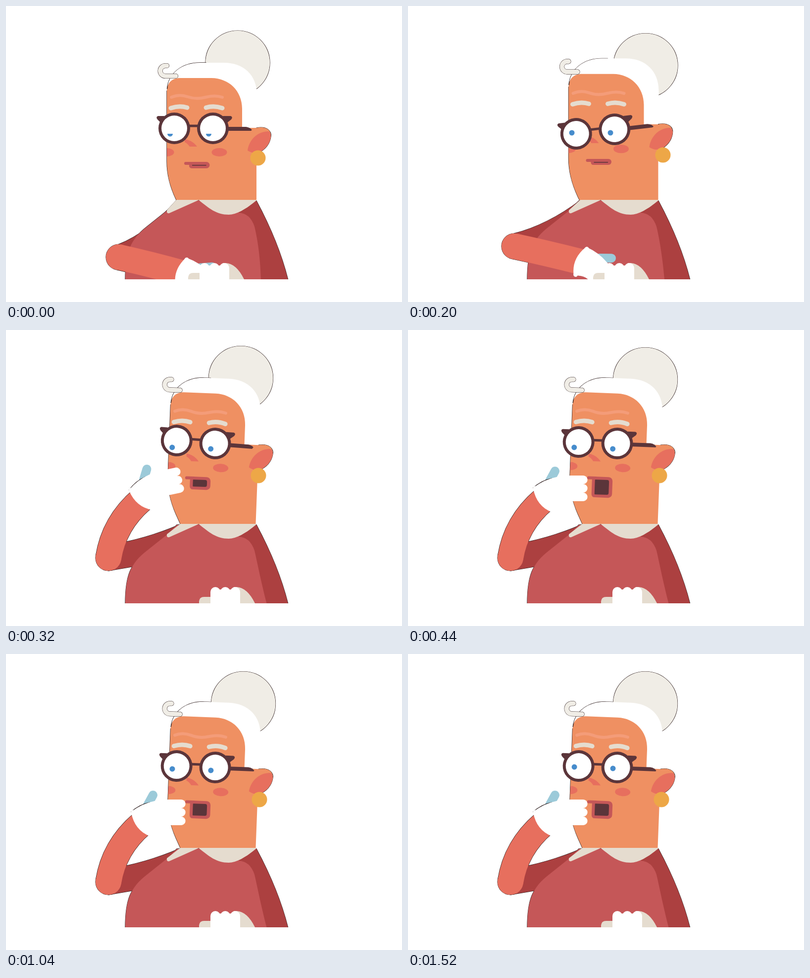
Write an HTML page with a canvas that moves like this. It is 800 px wide and 600 px high and loops after 1680 ms.

```html
<!DOCTYPE html>
<html lang="en">
<head>
<meta charset="utf-8">
<title>Lady with a glove</title>
<style>
html, body { margin: 0; width: 100%; height: 100%; overflow: hidden; background: #fff; }
canvas { display: block; }
</style>
</head>
<body>
<canvas id="stage" width="800" height="600"></canvas>
<script>
const g = document.getElementById('stage').getContext('2d');
const LOOP = 1680, STEP = 40, FLOOR = 554;
const SKIN = '#ef9062', PINK = '#e76f5e', RED = '#c55758', DARK = '#ac4040', CREAM = '#e5dccf',
  PALE = '#f0ede6', RIM = '#5b353a', GOLD = '#eda747', BLUE = '#468ccc', SKY = '#9ccad9',
  WRINKLE = '#f49c79', INK = '#2a1a1a', WHITE = '#fff';

// Each track holds one value per key time.
const KEYS = [0, 120, 200, 240, 320, 440];
const headTracks = {
  turn: [0, 0, 0, .038, .038, .038],
  x: [0, 0, -.5, .5, -1, -1],
  y: [0, 8, -8, -41, -14, -14],
  stretch: [0, 0, .01, .085, 0, 0],
  curl: [1, 1, 1, .38, 1, 1],
  bunX: [468, 472, 480, 486.5, 474.5, 479.5],
  bunY: [115, 123, 120.5, 66, 97.5, 100.5],
  ringX: [509, 512, 515, 516, 510, 508],
  ringY: [308, 314, 302, 286, 295, 295]
};
const faceTracks = {
  specsY: [0, 4, 14.5, 24.5, -2.2, -.7],
  specsTurn: [0, -.04, -.115, -.077, .039, 0],
  pupilY: [259, 262, 265, 275.6, 258.6, 258.6],
  pupilR: [5.5, 5.5, 5.5, 9, 5.5, 5.5],
  lid: [259, 245, 230, 230, 230, 230],
  mouth: [13, 13, 12, 12, 26, 42]
};
const armTracks = {
  neck: [344, 342, 348, 357, 352, 352],
  elbowX: [228, 226, 215, 212, 207, 207],
  elbowY: [509, 505, 487, 479, 462, 462],
  bendX: [295, 292, 280, 277, 218, 218],
  bendY: [524, 518, 501, 463, 392, 392],
  wristX: [355, 353, 349, 347.5, 274, 274],
  wristY: [541, 536, 518.5, 462, 343.5, 344],
  hand: [57, 60, 61.6, 57, -12, 0],
  lap: [-22, -20, -16, -11, 0, 0]
};

function at(t, times, vals) {
  if (t <= times[0]) return vals[0];
  const i = times.findIndex(k => k > t);
  if (i < 0) return vals[vals.length - 1];
  const k = (t - times[i - 1]) / (times[i] - times[i - 1]);
  return vals[i - 1] + (vals[i] - vals[i - 1]) * k;
}

function poseAt(t) {
  const p = {};
  for (const set of [headTracks, faceTracks, armTracks])
    for (const name in set) p[name] = at(t, KEYS, set[name]);
  p.ringX += at(t, [440, 560], [0, 4]);
  p.mouth -= at(t, [600, 800], [0, 6]);
  p.pupilY -= at(t, [960, 1040, 1320], [0, 5, 8.6]) + (t >= 1520 ? .4 : 0);
  return p;
}

function fill(d, color) {
  g.fillStyle = color;
  g.fill(new Path2D(d));
}

function line(d, color, width, cap = 'round') {
  g.strokeStyle = color;
  g.lineWidth = width;
  g.lineCap = cap;
  g.stroke(new Path2D(d));
}

function oval(x, y, rx, ry, color, edge) {
  g.beginPath();
  g.ellipse(x, y, rx, ry, 0, 0, 7);
  if (edge) {
    g.strokeStyle = INK;
    g.lineWidth = 1.2;
    g.stroke();
  }
  g.fillStyle = color;
  g.fill();
}

function group(draw, x = 0, y = 0, turn = 0, px = 0, py = 0, tall = 1) {
  g.save();
  g.translate(px + x, py + y);
  g.rotate(turn);
  g.scale(1, tall);
  g.translate(-px, -py);
  draw();
  g.restore();
}

function clipRect(y, h) {
  g.beginPath();
  g.rect(0, y, 800, h);
  g.clip();
}

const JAW = 'V315C325 345 333 370 344 393L357 419L370 445';
const SKULL = `M325 172${JAW}H506V180L415 140H352C335 146 325 156 325 172Z`;

function drawHair(p) {
  line('M325.5 168C328 136 356 115 392 115H404', INK, 1.4);
  fill('M325 172C327 136 355 115 392 115H440C480 115 507 140 507 180V247H477V208C477 172 450 146 415 146H352C335 146 325 156 325 172Z', WHITE);
  const a = Math.PI * (.5 + p.curl), r = 10.5;
  const ex = 322 + r * Math.cos(a), ey = 131.5 + r * Math.sin(a);
  const curl = `M343 142H322A${r} ${r} 0 0 1 ${ex} ${ey}` + (p.curl > .95 ? 'h3' : '');
  line(curl, INK, 10);
  line(curl, PALE, 9);
}

function drawMouth(h) {
  line('M363 319H376', RED, 6);
  g.fillStyle = RED;
  g.beginPath();
  g.roundRect(370, 316, 41.5, h, [3, 8, 8, 6]);
  g.fill();
  g.fillStyle = RIM;
  g.beginPath();
  g.roundRect(376, 322, 28.5, Math.max(1.6, h - 12), h > 20 ? [1, 4, 4, 1] : 0);
  g.fill();
}

function drawFace(p) {
  line('M325 172' + JAW, INK, 1.4);
  fill(SKULL, SKIN);
  g.save();
  g.clip(new Path2D(SKULL));
  oval(324, 296.5, 15.5, 8.5, PINK);
  oval(431, 296.5, 15.5, 8.5, PINK);
  fill('M361 270C374 272 381 278 386 285H371Q366 278 361 276Z', PINK);
  g.restore();
  drawHair(p);
  line('M334 185Q350 178 367 184T403 185T437 185', WRINKLE, 6);
  line('M333 207Q350 201 366 206M404 206Q420 201 437 207', CREAM, 9);
  group(() => drawMouth(p.mouth), 0, 55 * p.stretch);
}

function drawSpecs() {
  fill('M320 223H307Q302 225 306 230L314 238Z', RIM);
  fill('M438 223H454Q459 225 455 230L445 238Z', RIM);
  fill('M446 245H485Q494 246 498 253H446Z', RIM);
  line('M369 243H389', RIM, 5);
  for (const x of [340, 418]) {
    oval(x, 248, 32, 32, RIM);
    oval(x, 248, 26, 26, WHITE);
  }
}

function drawEar() {
  line('M506 247C528 243 537 254 535 265C533 281 522 292 508 299', INK, 1.2);
  fill('M489 268C489 252 502 246 515 246C530 246 536 255 535 265C533 281 522 292 506 300L489 294Z', SKIN);
  fill('M488 293C491 271 508 254 531 254Q536 259 535 265C533 281 522 291 511 297Q499 300 488 293Z', PINK);
}

function drawHead(p) {
  const stretched = part => group(part, 0, 0, 0, 0, 180, 1 + p.stretch);
  stretched(() => drawFace(p));
  group(drawSpecs, 0, p.specsY, p.specsTurn, 379, 248);
  g.save();
  clipRect(p.lid, 200);
  for (const x of [331.5, 409.5]) oval(x, p.pupilY, 5.5, p.pupilR, BLUE);
  g.restore();
  stretched(drawEar);
}

function drawBody(p, forearm) {
  const { neck, elbowX: x, elbowY: y } = p, top = y - 26;
  const dx = neck - x, dy = top - 394;
  const upper = `M${neck} 394C${neck - .3 * dx} ${394 + .45 * dy} ${neck - .65 * dx} ${394 + .82 * dy} ${x} ${top}V${y + 26}L300 472L400 394Z`;
  const front = `M241 556C241 500 250 474 285 447L330 411L345 395H470V419Q493 420 502 447C507 468 514 505 ${527 + p.lap * .55} 556Z`;
  const back = 'M460 395H506C530 440 555 495 570 556H460Z';
  line(forearm, INK, 53.4, 'butt');
  oval(x, y, 26, 26, PINK, true);
  for (const d of [upper, front, back]) line(d, INK, 1.4);
  fill(upper, DARK);
  fill(back, DARK);
  fill(front, RED);
  fill(`M${neck} 393H390L332 419Q324 423 325 414Z`, CREAM);
  fill('M389 393H507C485 412 465 423 450 423C425 423 410 410 389 393Z', CREAM);
}

function drawGlove(outlined) {
  line('M285 308L297 286', SKY, 18);
  if (outlined) line('M253 320Q270 305 290 301', INK, 1.4);
  const knuckle = 'a8.65 8.65 0 0 1 0 17.3';
  fill(`M254 319Q275 303 300 298Q312 295 330 295H354${knuckle.repeat(3)}H320Q305 347 296 362L290 369Q260 357 253 322Z`, WHITE);
  oval(257, 321, 4.5, 4.5, WHITE);
  oval(292, 365.5, 4.5, 4.5, WHITE);
}

function drawLapHand() {
  fill('M390 556V550Q391 541 400 541H420V556Z', CREAM);
  fill('M460 521H466Q488 522 504 556H460Z', CREAM);
  fill('M413 556V531a10 10 0 0 1 20 0a10 10 0 0 1 20 0a10 10 0 0 1 20 0V556Z', WHITE);
  fill('M419 526H467V535H419Z', WHITE);
}

function draw(t) {
  const p = poseAt(t);
  g.clearRect(0, 0, 800, 600);
  g.save();
  clipRect(0, FLOOR);
  oval(p.bunX, p.bunY, 65, 65, PALE, true);

  g.save();
  clipRect(0, 394);
  group(() => drawHead(p), p.x, p.y, p.turn, 506, 393);
  g.restore();
  oval(p.ringX, p.ringY, 15.5, 15.5, GOLD);

  const forearm = `M${p.elbowX} ${p.elbowY}Q${p.bendX} ${p.bendY} ${p.wristX} ${p.wristY}`;
  drawBody(p, forearm);
  line(forearm, PINK, 52, 'butt');
  oval(p.elbowX, p.elbowY, 26, 26, PINK);
  group(() => drawGlove(p.wristX < 300), p.wristX - 274, p.wristY - 344, p.hand * Math.PI / 180, 274, 344);
  group(drawLapHand, p.lap);
  g.restore();
}

function tick() {
  draw(Math.floor(performance.now() % LOOP / STEP) * STEP);
  requestAnimationFrame(tick);
}
tick();
</script>
</body>
</html>
```
